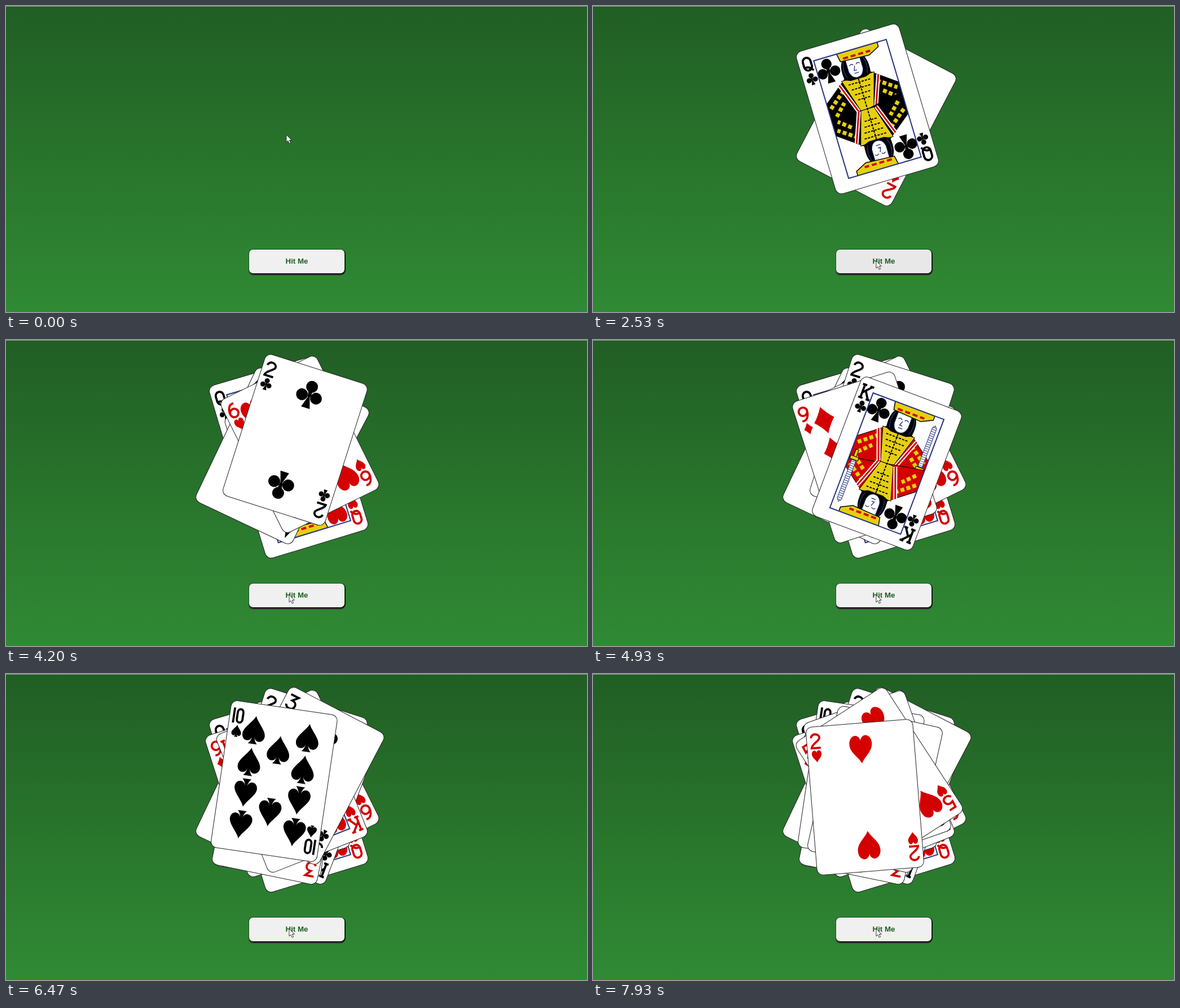
Animation of 1030x544 px, one loop 8 s. Source, as an HTML page:

```html
<!DOCTYPE html>
<html lang="en">
<head>
<meta charset="utf-8">
<title>Hit Me</title>
<style>
  html, body { margin: 0; width: 100%; height: 100%; overflow: hidden; }
  body { position: relative; background: linear-gradient(#215e24, #308a34); }
  body::before { content: ""; position: absolute; inset: 0 0 auto; height: 1px; background: #93a595; }
  svg { position: absolute; left: 0; top: 0; }
  #button {
    position: absolute; left: 431px; top: 433px; width: 169px; height: 42px;
    border-radius: 7px; background: #f0f0f0; color: #1b5e20;
    box-shadow: 0 0 0 1px #1a4f1e, 1px 1px 0 1px #000, 0 3px 0 1px #3c403c;
    font: bold 13.333px/42px "Liberation Sans", Arial, sans-serif; text-align: center;
  }
  #button.pressed { background: #e8e8e8; }
</style>
</head>
<body>
<svg id="table" width="1030" height="544">
  <clipPath id="frame"><path d="M-67-109H67V109H-67Z"/></clipPath>
</svg>
<div id="button">Hit Me</div>
<svg width="1030" height="544">
  <path id="cursor" d="M0 0V13.2L3 10.4L5.2 15.4L7.6 14.3L5.4 9.5H9.3Z" fill="#fff" stroke="#222" stroke-width=".9"/>
</svg>
<script>
const LOOP = 8000;
const RED = '#d40000', YELLOW = '#e6cf10', BLUE = '#26347f';

// time dealt, rank, suit, centre x, centre y, angle
const deals = [
  [1800, '2', 'D', 502, 198, 27.5],
  [2270, 'Q', 'C', 486.5, 183, -16.5],
  [2730, 'Q', 'H', 515, 236.5, -17],
  [3130, 'A', 'C', 475.5, 206, 25.4],
  [3530, '6', 'H', 521, 185.5, -26.3],
  [3930, '2', 'C', 512.5, 177.5, 17.7],
  [4270, '9', 'D', 481.5, 208.7, -17.7],
  [4600, 'K', 'C', 521, 219.7, 20.6],
  [5000, 'J', 'C', 478, 220.4, 6.5],
  [5400, '3', 'D', 483.2, 227.2, 11.6],
  [5730, 'K', 'H', 507, 198, -21.5],
  [6070, '3', 'C', 528.5, 181, 27.6],
  [6470, '10', 'S', 475.3, 190.5, 8.4],
  [6870, '9', 'S', 504, 183, -19.3],
  [7200, '6', 'D', 500, 205, 12.6],
  [7530, '5', 'H', 507.5, 183, -33],
  [7930, '2', 'H', 482, 219, -4.6],
];

const suits = {
  H: 'M0 25C-4 14-20 5-20-10C-20-21-13-25-9-25C-4-25 0-20 0-15C0-20 4-25 9-25C13-25 20-21 20-10C20 5 4 14 0 25Z',
  S: 'M0-25C4-14 20-2 20 9C20 16 15 20 11 20C6 20 3 17 2 12Q3 20 8 25H-8Q-3 20-2 12C-3 17-6 20-11 20C-15 20-20 16-20 9C-20-2-4-14 0-25Z',
  D: 'M0-24.5Q8-10 18.5 0Q8 10 0 24.5Q-8 10-18.5 0Q-8-10 0-24.5Z',
  C: 'M-10.5-14a10.5 10.5 0 1 1 21 0a10.5 10.5 0 1 1-21 0ZM-23.5 4a10.5 10.5 0 1 1 21 0a10.5 10.5 0 1 1-21 0Z'
    + 'M2.5 4a10.5 10.5 0 1 1 21 0a10.5 10.5 0 1 1-21 0ZM-4-6H4L2 6L8 25H-8L-2 6Z',
};

const ranks = {
  A: 'M-8 12L0-12L8 12M-5 4H5M-11 12.5h7M4 12.5h7',
  2: 'M-7.5-6A7.5 6.5 0 0 1 7.5-6C7.5 0-7 4-7.5 12H8.5',
  3: 'M-8-12H7L-1-3C11-3 10 12 0 12Q-6 12-8 7',
  5: 'M7-12H-5L-6-1C8-7 12 12 0 12Q-6 12-8 7',
  6: 'M6-11.5C-3-14-7.5-4-7.5 4.5A7.5 7.5 0 1 0 7.5 4.5A7.5 7.5 0 1 0-7.5 4.5',
  9: 'M-6 11.5C3 14 7.5 4 7.5-4.5A7.5 7.5 0 1 0-7.5-4.5A7.5 7.5 0 1 0 7.5-4.5',
  10: 'M-8-13.5V13.5M-2-6a5 6 0 0 1 10 0V6a5 6 0 0 1-10 0Z',
  J: 'M-2-12H9M4-12V5A6 6.5 0 0 1-8 5',
  Q: 'M-7-5a7 7 0 0 1 14 0V4a7 7 0 0 1-14 0ZM-5 5Q2 4 8 13',
  K: 'M-6-12V12M8-12L-6 3M-1-2L8 12M-10-12h8M-10 12h8M4-12h7M4 12h7',
};

const outer = [[-48, -85], [48, -85]], inner = [[-48, -28], [48, -28]];
const upperPips = { 2: [[0, -85]], 3: [[0, -85]], 5: outer, 6: outer, 9: [...outer, ...inner], 10: [...outer, ...inner, [0, -56]] };
const centrePips = { A: [[0, 0]], 3: [[0, 0]], 5: [[0, 0]], 6: [[-48, 0], [48, 0]], 9: [[0, 0]] };

const path = (d, fill, stroke = 'none', width = 1, more = '') =>
  `<path d="${d}" fill="${fill}" stroke="${stroke}" stroke-width="${width}" ${more}/>`;
const bothEnds = half => half + `<g transform="rotate(180)">${half}</g>`;
const pip = (suit, x, y, size = 1) =>
  path(suits[suit], ink(suit), 'none', 0, `transform="translate(${x} ${y}) scale(${size})"`);
const ink = suit => 'HD'.includes(suit) ? RED : '#000';

function courtHalf(rank, suit) {
  const robe = rank === 'Q' ? '#000' : RED;
  const held = rank === 'Q' ? '' :
    path('M53-15V-88L57-93L61-88V-15Z', '#fff', BLUE) +
    path('M57-90V-16', 'none', BLUE, 7, 'stroke-dasharray="1 3"') +
    path('M50-14H65V-8H50ZM55-8H60V5H55Z', YELLOW, '#000');
  return path('M-67 12V-28L-24-62H24L67-30V-12Z', robe, '#000') +
    path('M-62-18L-30-44M30-44L62-22M-56-2L-36-22M36-24L57-7', 'none', YELLOW, 7, 'stroke-dasharray="7 4"') +
    path('M-30-60L-12 0H12L30-60Z', YELLOW, '#000') +
    path('M-20-50H20M-17-40H17M-14-30H14M-11-20H11M0-56V0', 'none', '#000', 2, 'stroke-dasharray="4 2"') +
    path('M-36-54L-16 0M36-54L16 0', 'none', '#fff', 7) +
    path('M-36-54L-16 0M36-54L16 0', 'none', RED, 3) +
    held +
    path('M-24-60Q-30-102 0-102Q30-102 24-60L14-56H-14Z', '#000') +
    path('M-13-94H13V-72Q10-59 0-59Q-10-59-13-72Z', '#fff', BLUE) +
    path('M-9-82q4-4 7 0M3-82q4-4 7 0M0-80l-3 8h5M-4-67h8M-18-92q-6 16 0 30M18-92q6 16 0 30', 'none', BLUE, 1.4) +
    path('M-22-94L-25-109H50V-101L30-91Z', YELLOW, '#000', 1.5) +
    path('M-16-98H34', 'none', RED, 4, 'stroke-dasharray="9 5"') +
    pip(suit, -47, -85, .88);
}

function face(rank, suit) {
  if ('JQK'.includes(rank))
    return `<g clip-path="url(#frame)">${bothEnds(courtHalf(rank, suit))}</g>` +
      path('M-67-109H67V109H-67Z', 'none', BLUE, 2);
  const place = spots => (spots || []).map(([x, y]) => pip(suit, x, y)).join('');
  return bothEnds(place(upperPips[rank])) + place(centrePips[rank]);
}

function card([, rank, suit, x, y, angle]) {
  const corner = path(ranks[rank], 'none', ink(suit), 3.8, 'transform="translate(-79.5 -106)"') +
    pip(suit, -79, -79, .43);
  return `<g class="card" transform="translate(${x} ${y}) rotate(${angle})">
    <rect x="-95" y="-132" width="190" height="264" rx="11" fill="#fff" stroke="#222"/>
    ${face(rank, suit)}${bothEnds(corner)}</g>`;
}

const table = document.getElementById('table');
const button = document.getElementById('button');
const cursor = document.getElementById('cursor');
table.insertAdjacentHTML('beforeend', deals.map(card).join(''));
const cards = table.querySelectorAll('.card');

function ease(t, from, to) {
  const p = Math.min(1, Math.max(0, (t - from) / (to - from)));
  return p * p * (3 - 2 * p);
}

function draw() {
  const t = performance.now() % LOOP;
  const travel = ease(t, 100, 870), settle = ease(t, 1100, 1730);
  const x = 497 + 5 * travel - 4 * Math.sin(Math.PI * travel);
  const y = 229 + 213 * travel + 11 * settle;
  cursor.setAttribute('transform', `translate(${x} ${y})`);
  deals.forEach(([time], i) => { cards[i].style.display = t >= time ? '' : 'none'; });
  button.classList.toggle('pressed', deals.some(([time]) => t >= time - 200 && t < time - 70));
  requestAnimationFrame(draw);
}
draw();
</script>
</body>
</html>
```
